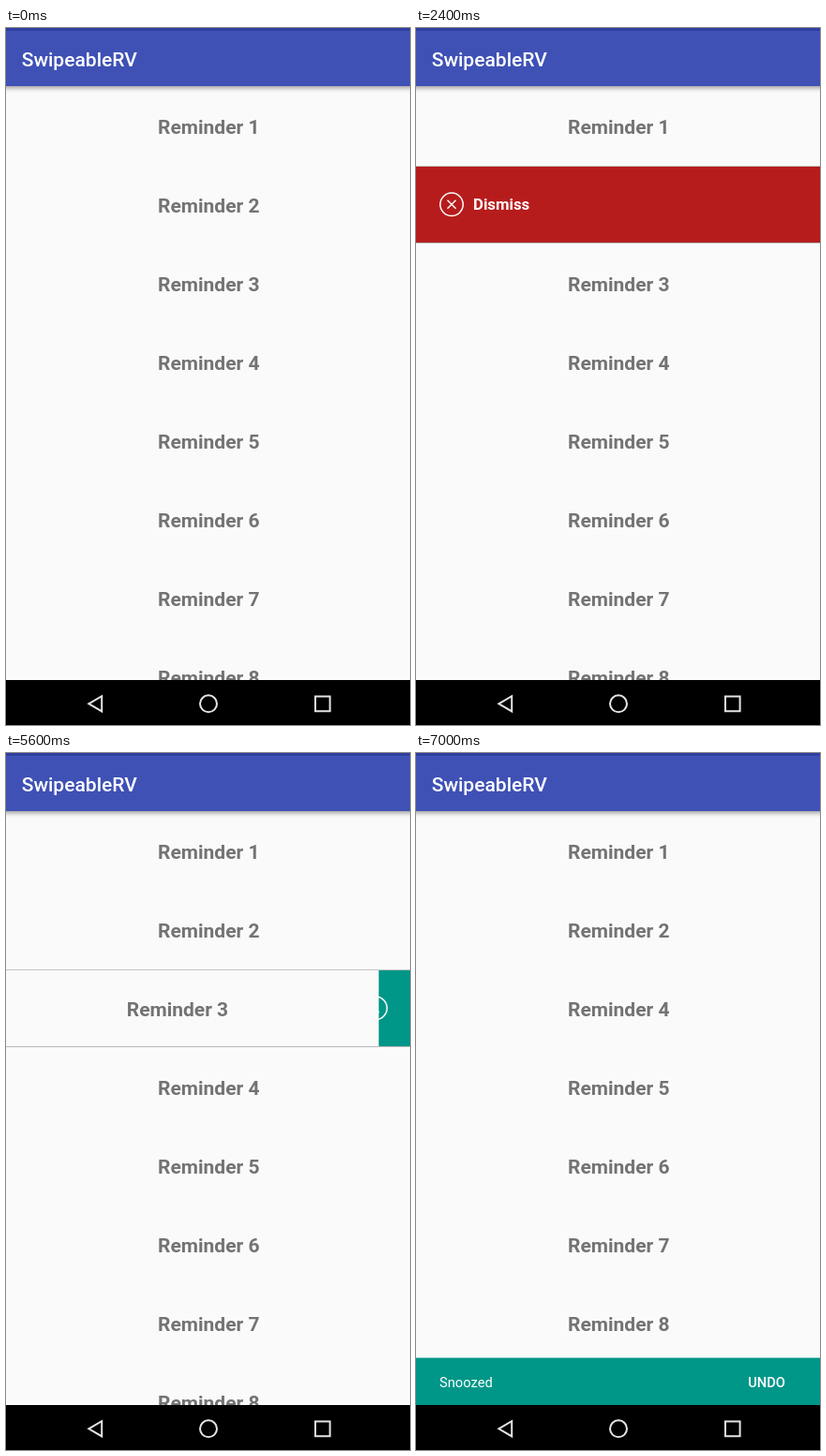
Recreate the animation shown at these times as an HTML page with a canvas. Size 431 px wide and 744 px high, loop 8000 ms.

```html
<!DOCTYPE html>
<html lang="en">
<head>
<meta charset="utf-8">
<title>Swipeable list</title>
<style>
  html, body { margin: 0; width: 100%; height: 100%; overflow: hidden; background: #fafafa; }
  canvas { display: block; }
</style>
</head>
<body>
<canvas id="stage" width="431" height="744"></canvas>
<script>
const W = 431, H = 744, TOP = 63, ROW = 84, NAV = 696, LOOP = 8000, STEP = 200;
const BG = '#fafafa', RED = '#b71c1c', TEAL = '#009688', WHITE = '#fff';
const g = document.getElementById('stage').getContext('2d');

// Progress from 0 to 1 between two times
const ramp = (t, start, end) => Math.min(1, Math.max(0, (t - start) / (end - start)));
const easeOut = p => 1 - (1 - p) ** 2;

function rect(x, y, w, h, color) {
  g.fillStyle = color;
  g.fillRect(x, y, w, h);
}

function text(str, x, y, size, weight, color = WHITE, align = 'left') {
  g.font = `${weight} ${size}px Roboto, sans-serif`;
  g.textAlign = align;
  g.fillStyle = color;
  g.fillText(str, x, y);
}

function stroke(path, width, color) {
  g.lineWidth = width;
  g.strokeStyle = color;
  g.stroke(new Path2D(path));
}

function ring(x, y, r, width, color) {
  stroke(`M${x - r} ${y}a${r} ${r} 0 1 1 ${2 * r} 0a${r} ${r} 0 1 1 ${-2 * r} 0z`, width, color);
}

function panel(y, swipe) {
  const mid = y + 41.3;
  rect(0, y + 0.5, W, 82, swipe.color);
  ring(swipe.iconX, mid, 12.2, 1.5, WHITE);
  stroke(`M${swipe.iconX} ${mid}${swipe.icon}`, 1.5, WHITE);
  text(swipe.action, swipe.textX, y + 47, 16.8, 700);
}

function label(n, dx, y) {
  text('Reminder ' + n, 216.3 + dx, y + 49.5, 21, 700, '#737373', 'center');
}

function list(swipe, dx, gone) {
  for (let n = 1; n <= 9; n++) {
    const y = TOP + ROW * (n - 1 - (n > swipe.row ? gone : 0));
    if (n !== swipe.row) {
      label(n, 0, y);
    } else if (!gone) {
      if (dx) {
        panel(y, swipe);
        rect(dx, y, W, ROW, BG);
        rect(0, y, W, 1, '#c4c4c4');
        rect(0, y + 82, W, 1, '#b8b8b8');
      }
      label(n, dx, y);
    }
  }
}

function appBar() {
  g.save();
  g.shadowColor = 'rgba(0,0,0,.4)';
  g.shadowBlur = 5;
  g.shadowOffsetY = 2;
  rect(-10, 0, W + 20, 62, '#3f51b5');
  g.restore();
  rect(0, 0, W, 3, '#303f9f');
  text('SwipeableRV', 16.7, 41.3, 21, 500);
}

function snackbar(swipe, shown) {
  const y = NAV - 50.4 * shown;
  rect(0, y, W, 51, swipe.color);
  text(swipe.done, 25, y + 31, 14.7, 400);
  text('UNDO', 394, y + 31, 14.7, 500, WHITE, 'right');
}

function navBar() {
  const color = '#e4e4e4';
  rect(0, NAV, W, H - NAV, '#000');
  stroke('M88.3 721.3L102.2 713.2V729.4Z', 2, color);
  ring(216, 721.3, 9, 2, color);
  stroke('M330 713.6h15.6v15.6h-15.6z', 2, color);
}

const dismiss = {
  row: 2, color: RED, action: 'Dismiss', done: 'Dismissed', textX: 61,
  iconX: 38, icon: 'm-4.5 -4.5l9 9m0 -9l-9 9',
  dx: t => t < 4000 ? W * ramp(t, 1000, 2400) ** 1.73 : 0,
  bar: t => easeOut(ramp(t, 2400, 2800)) - ramp(t, 3800, 4200),
  gone: t => ramp(t, 2800, 3200) - ramp(t, 4200, 4600)
};
const snooze = {
  row: 3, color: TEAL, action: 'Snooze', done: 'Snoozed', textX: 315,
  iconX: 394.3, icon: 'm0 -8v8.5l3.6 4.5',
  dx: t => -W * ramp(t, 5400, 6400) ** 1.59,
  bar: t => easeOut(ramp(t, 6200, 6600)),
  gone: t => ramp(t, 6600, 7000)
};

function draw(now) {
  // The screen refreshes five times a second
  const t = Math.floor(now % LOOP / STEP) * STEP;
  const swipe = t < 5000 ? dismiss : snooze;
  rect(0, 0, W, H, BG);
  list(swipe, swipe.dx(t), swipe.gone(t));
  appBar();
  snackbar(swipe, swipe.bar(t));
  navBar();
  requestAnimationFrame(draw);
}
draw(performance.now());
</script>
</body>
</html>
```
